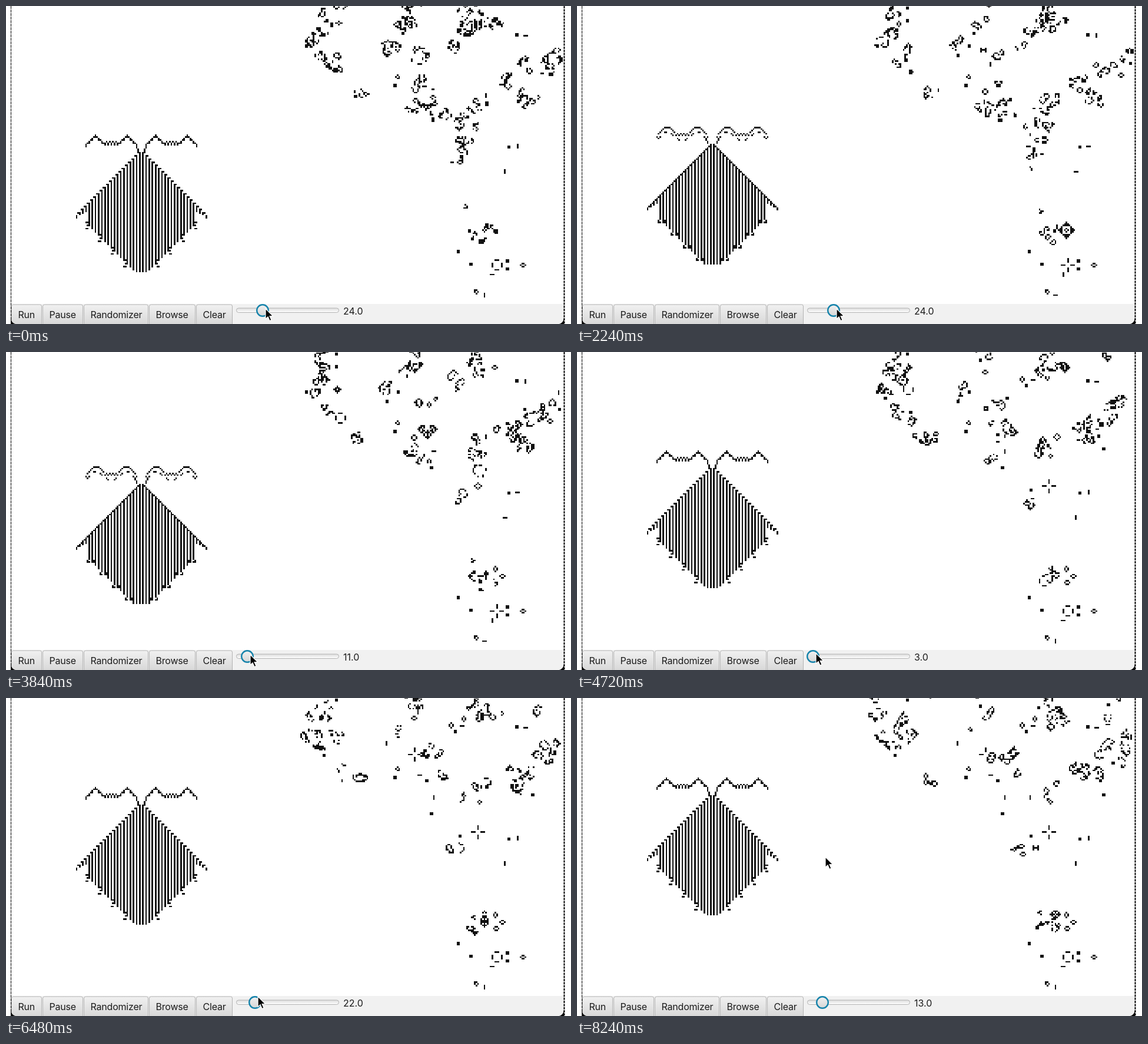
An HTML page with a canvas that plays this animation: 960 by 540 pixels, repeating every 8320 ms.

```html
<!DOCTYPE html>
<html lang="en">
<head>
<meta charset="utf-8">
<title>Game of Life</title>
<style>
  html, body { margin: 0; width: 960px; height: 540px; overflow: hidden; background: #fff; }
  canvas, svg { position: absolute; left: 0; top: 0; display: block; }
  text { font: 16px Inter, Roboto, "Liberation Sans", sans-serif; letter-spacing: -0.2px; fill: #1c1c1c; }
  #value { letter-spacing: 0; }
</style>
</head>
<body>
<canvas id="field" width="960" height="540"></canvas>
<svg width="960" height="540" viewBox="0 0 960 540">
  <defs>
    <linearGradient id="face" x1="0" y1="0" x2="0" y2="1">
      <stop offset="0" stop-color="#f1f1f1"/><stop offset="1" stop-color="#d6d6d6"/>
    </linearGradient>
    <linearGradient id="groove" x1="0" y1="0" x2="0" y2="1">
      <stop offset="0" stop-color="#dcdcdc"/><stop offset="1" stop-color="#fff"/>
    </linearGradient>
  </defs>
  <rect x="8" y="506" width="940" height="34" fill="#f1f1f1"/>
  <g id="buttons"></g>
  <rect x="391.5" y="513" width="174" height="7.5" rx="3.7" fill="url(#groove)" stroke="#b4b4b4"/>
  <text id="value" x="573" y="523.5">24.0</text>
  <circle id="thumb" cy="517" r="9.8" fill="url(#face)" stroke="#1583ab" stroke-width="2.4"/>
  <path d="M8.5 0V540" stroke="#000" stroke-dasharray="5 1"/>
  <path d="M948.5 0V540" stroke="#000" stroke-width="2" stroke-dasharray="4 1.3"/>
  <path d="M8 530Q9 538 16 540H8ZM948 530Q947 538 940 540H948Z"/>
  <path id="cursor" d="M0 0V17.5L4.1 13.8L7 20.5L10 19.2L7.1 12.7H12.6Z" fill="#000" stroke="#fff" stroke-width="1.2"/>
</svg>
<script>
const LOOP = 8320, TICK = 80;
const CELL = 2.686, X0 = 5.75, Y0 = -2;
const COLS = 352, ROWS = 214, PAD = 24, LAST = 62, PATCHES = 70;
const $ = id => document.getElementById(id);
const ctx = $('field').getContext('2d');

// key points: time, value
const GENS = [[0, 0], [3840, 19], [4100, 22], [4720, 38], [4960, 41], [8240, LAST]];
const THUMB = [[0, 436], [3360, 436], [4006, 401], [4800, 401], [5040, 434], [6389, 434], [6530, 417]];
const CURSOR_Y = [[0, 514], [3840, 514], [6480, 507], [7440, 507], [8080, 270]];

function mix(keys, t) {
  const i = keys.findIndex(k => k[0] > t);
  if (i < 1) return keys[i ? keys.length - 1 : 0][1];
  const [t0, a] = keys[i - 1], [t1, b] = keys[i];
  return a + (b - a) * (t - t0) / (t1 - t0);
}

let seed = 7341;
function rand() {
  seed = (seed + 0x6D2B79F5) | 0;
  let v = Math.imul(seed ^ seed >>> 15, 1 | seed);
  v = (v + Math.imul(v ^ v >>> 7, 61 | v)) ^ v;
  return ((v ^ v >>> 14) >>> 0) / 4294967296;
}

// the soup lives inside this outline
const AREA = new Path2D('M490-70V60L535 95V160H618L660 70L655 155L732 220V310H830V230L885 180L947 110V-70ZM762 360H868V418H790Z');
const inside = (x, y) => ctx.isPointInPath(AREA, x, y);
const at = (x, y) => (y + PAD) * COLS + x;
const blank = () => new Uint8Array(COLS * ROWS);

const open = blank();
for (let y = 1 - PAD; y < ROWS - PAD - 1; y++)
  for (let x = 1; x < COLS - 1; x++)
    open[at(x, y)] = inside(X0 + (x + .5) * CELL, Y0 + (y + .5) * CELL) ? 1 : 0;

function step(now, mask) {
  const next = blank();
  for (let i = COLS + 1; i < now.length - COLS - 1; i++) {
    if (mask && !mask[i]) continue;
    const u = i - COLS, d = i + COLS;
    const n = now[u - 1] + now[u] + now[u + 1] + now[i - 1] + now[i + 1] + now[d - 1] + now[d] + now[d + 1];
    next[i] = n === 3 || (n === 2 && now[i]) ? 1 : 0;
  }
  return next;
}

function makeSoup() {
  let grid = blank();
  for (let left = PATCHES; left > 0;) {
    const px = 490 + rand() * 457, py = -55 + rand() * 470;
    if (!inside(px, py) || (py > 230 && rand() < .4)) continue;
    left--;
    const cx = Math.round((px - X0) / CELL), cy = Math.round((py - Y0) / CELL);
    const r = (7 + rand() * 10) / CELL, n = Math.ceil(r);
    for (let y = -n; y <= n; y++)
      for (let x = -n; x <= n; x++) {
        const p = at(cx + x, cy + y);
        if (x * x + y * y <= r * r && open[p] && rand() < .4) grid[p] = 1;
      }
  }
  for (let i = 0; i < 5; i++) grid = step(grid, open);
  return grid;
}

const SHAPES = {
  block: '## ##', bar: '###', post: '# # #', hive: '.##. #..# .##.',
  boat: '##. #.# .#.', glider: '.#. ..# ###'
};

function makeQuiet() {
  const grid = blank();
  const add = (name, ...spots) => spots.forEach(([x, y]) =>
    SHAPES[name].split(' ').forEach((row, j) => [...row].forEach((c, i) => {
      if (c === '#') grid[at(x + i, y + j)] = 1;
    })));
  add('block', [283, 155], [291, 163], [314, 161], [314, 166], [187, 25], [315, 89], [314, 45]);
  add('bar', [307, 161], [307, 167], [304, 170], [300, 140]);
  add('post', [305, 163], [311, 163], [300, 182], [321, 88], [313, 104]);
  add('hive', [323, 163]);
  add('boat', [294, 180]);
  add('glider', [287, 126]);
  return grid;
}

const soups = [makeSoup()], quiets = [makeQuiet()];
for (let i = 0; i < LAST; i++) {
  soups.push(step(soups[i], open));
  quiets.push(step(quiets[i]));
}

function cell(x, y) {
  const l = Math.round(X0 + x * CELL), t = Math.round(Y0 + y * CELL);
  ctx.fillRect(l, t, Math.round(X0 + (x + 1) * CELL) - l, Math.round(Y0 + (y + 1) * CELL) - t);
}

// two-phase ship, mirrored about its middle column
function drawShip(gen) {
  const odd = gen & 1, top = 82 - Math.floor(gen / 2);
  const put = (k, row) => { cell(83 - k, top + row); cell(83 + k, top + row); };

  // wings: round arches in one phase, pointed ones in the other
  for (let d = -16; d <= 16; d++) {
    const a = Math.abs(d);
    const r = odd ? Math.round(.14 * (a - 9.5) ** 2) : Math.abs(a - 10);
    const row = a < 5 ? 5 - (a & 1) : r;
    put(19 + d, row);
    if (odd ? a % 4 > 1 : !(a & 1)) put(19 + d, Math.min(8, row + 1 + 2 * odd));
  }
  for (let r = 8; r < 12 - odd; r++) put(Math.round((13 - r) / 2) + odd, r);

  // striped body
  for (let k = 1; k <= 41; k += 2) {
    const from = k + 10;
    const to = k > 33 ? from + (41 - k) / 2 : Math.min(86, 90 + odd - k);
    for (let r = from; r <= to; r++) put(k, r);
    if (k < 41) put(k + 1, from + odd);
    if (k > 34) put(k, k + 11);
  }

  // tassels along the lower edges
  for (let f = 8; f <= 32; f += 8) {
    const end = 91 + odd - f;
    if (odd) for (const s of [-1, 1]) {
      put(f + s, end);
      put(f + 2 * s, end);
      put(f + 2 * s, end - 1);
    }
    else for (let i = 0; i < 3; i++) {
      put(f + 2, end - 2 * i);
      put(f + 3 - 2 * (i & 1), end - 2 * i);
    }
  }
}

function drawField(gen) {
  ctx.fillStyle = '#fff';
  ctx.fillRect(0, 0, 960, 540);
  ctx.fillStyle = '#111';
  for (let y = 0; y < 189; y++)
    for (let x = 0; x < COLS; x++)
      if (soups[gen][at(x, y)] || quiets[gen][at(x, y)]) cell(x, y);
  drawShip(gen);
}

const NAMES = ['Run', 'Pause', 'Randomizer', 'Browse', 'Clear'], EDGES = [9, 62, 132, 243, 323, 386];
$('buttons').innerHTML = NAMES.map((name, i) =>
  `<rect x="${EDGES[i] + .5}" y="507" width="${EDGES[i + 1] - EDGES[i] - 2}" height="36" rx="3" fill="url(#face)" stroke="#b3b3b3"/>
   <text x="${EDGES[i] + 11.5}" y="530">${name}</text>`).join('');

let shown = -1;
function render(time) {
  const t = Math.floor((time % LOOP) / TICK) * TICK;
  const gen = Math.floor(mix(GENS, t) + 1e-6);
  if (gen !== shown) drawField(shown = gen);
  const thumb = mix(THUMB, t);
  // the readout trails the thumb by one tick
  const value = 3 + .6 * (mix(THUMB, Math.max(0, t - TICK)) - 401);
  $('thumb').setAttribute('cx', thumb);
  $('value').textContent = Math.round(value).toFixed(1);
  $('cursor').setAttribute('transform', `translate(${thumb + 5} ${mix(CURSOR_Y, t)})`);
}

const start = performance.now();
function loop() {
  render(performance.now() - start);
  requestAnimationFrame(loop);
}
loop();
</script>
</body>
</html>
```
